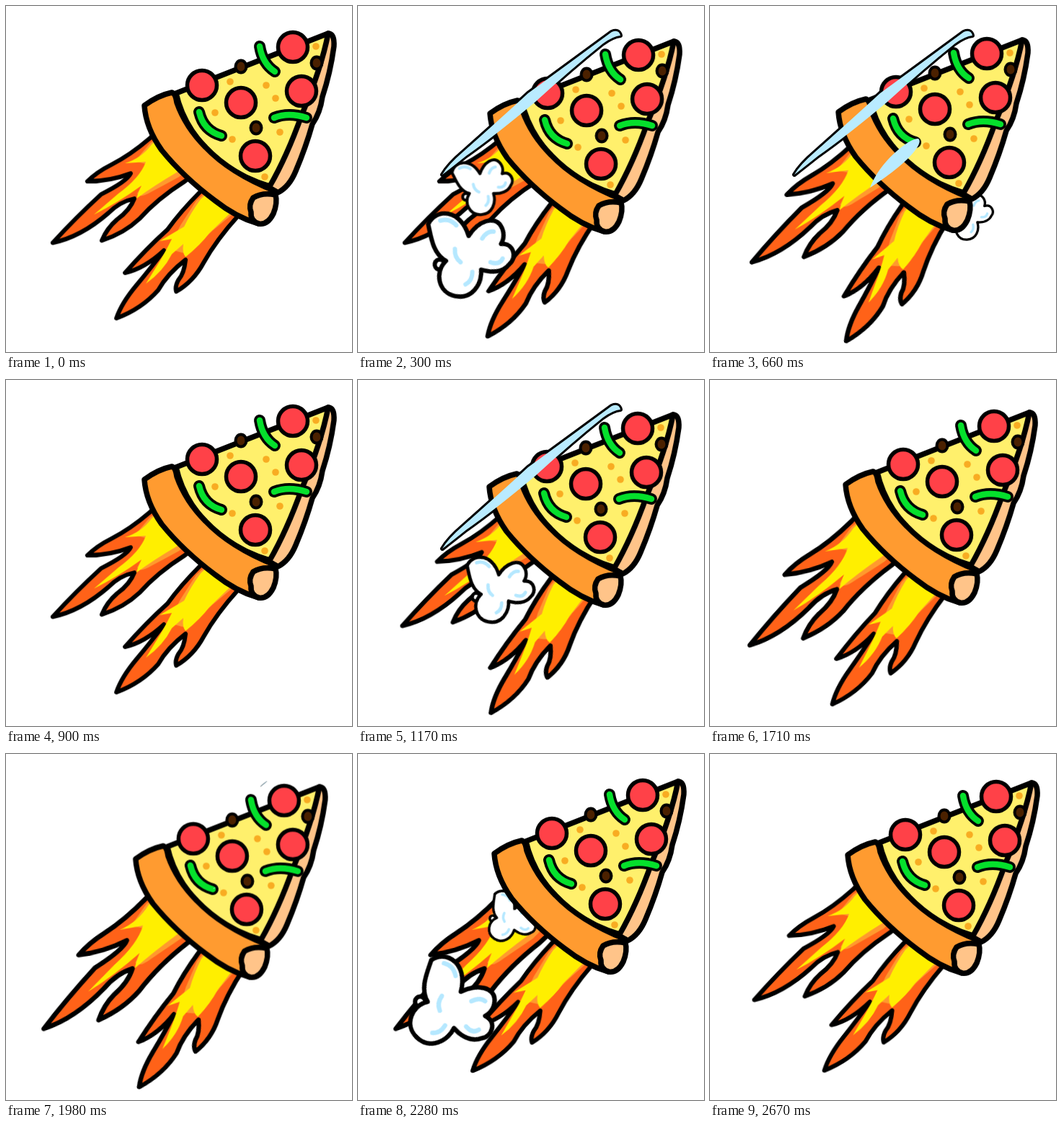
Write an HTML page without scripts that moves like this. It is 480 px wide and 480 px high and loops after 2.7 s.

```html
<!DOCTYPE html>
<html lang="en">
<head>
<meta charset="utf-8">
<title>Rocket pizza</title>
<style>
html, body { margin: 0; width: 100%; height: 100%; overflow: hidden; background: #fff; }
svg { display: block; width: 100%; height: 100%; }
.ink { stroke: #000; stroke-linejoin: round; stroke-linecap: round; }
.slice { stroke-width: 7.5; }
.flame { stroke-width: 6; fill: #ff6218; }
.glow { fill: #ff9a2e; }
.core { fill: #ffef00; }
.pepper { fill: none; stroke-linecap: round; }

#pizza { animation: bob 450ms linear infinite; }
@keyframes bob {
  0%, 100% { transform: translate(0, 0); }
  6.7% { transform: translate(-3px, 0); }
  46.7% { transform: translate(-14px, 9px); }
  60% { transform: translate(-10px, 10px); }
  66.7% { transform: translate(-9px, 11px); }
  80% { transform: translate(-4px, 7px); }
  93.3% { transform: translate(-1px, 2px); }
}

#left { animation: flareLeft 150ms linear infinite alternate; }
@keyframes flareLeft {
  to { transform: matrix(1.15, -.164, .083, 1.165, -52, 23); }
}
#right { animation: flareRight 225ms linear infinite alternate; }
@keyframes flareRight {
  to { transform: matrix(1.043, -.207, .264, .944, -83, 89); }
}

.puff { animation: puff 900ms linear infinite; animation-delay: calc(var(--start) - 900ms); }
@keyframes puff {
  0% { transform: translate(0, 0) scale(.54); visibility: visible; }
  3.33% { transform: translate(-42px, 55px) scale(.78); }
  6.67% { transform: translate(-85px, 110px) scale(1); }
  10.5% { transform: translate(-133px, 172px) scale(1.2); visibility: visible; }
  10.51%, 100% { transform: translate(-133px, 172px) scale(1.2); visibility: hidden; }
}

.streak { fill: #b9ebff; }
.rim { stroke: #000; stroke-width: 6; stroke-linejoin: round; }
.long { animation: long 450ms linear infinite; }
@keyframes long {
  0%, 40% { transform: translate(362px, 38px) scale(0); }
  46%, 67% { transform: none; }
  76%, 100% { transform: translate(118px, 233px) scale(0); }
}
.short { animation: short 450ms linear infinite; }
@keyframes short {
  0%, 40% { transform: translate(290px, 185px) scale(0); }
  46%, 48% { transform: none; }
  56%, 100% { transform: translate(224px, 250px) scale(0); }
}
</style>
</head>
<body>
<svg viewBox="0 0 480 480">
  <defs>
    <g id="cloud">
      <g class="ink" fill="#fff" stroke-width="6">
        <circle cx="-31" cy="20" r="7"/>
        <path d="M-24 13C-44 8-52-14-60-30C-56-54-22-62-2-28C6-52 26-64 38-52C46-44 46-34 44-28C62-34 70-14 62-4C56 10 40 14 26 13C32 32 24 56 0 57C-24 58-36 32-24 13Z"/>
      </g>
      <path fill="none" stroke="#b5e8ff" stroke-width="6" stroke-linecap="round" d="M-45-39Q-34-46-22-38M17-29Q21-41 30-42M36 0Q49 1 51-9M10 38Q18 31 15 19M-16-6Q-14 6-4 10"/>
    </g>
    <circle id="salami" class="ink" r="20.5" fill="#ff4148" stroke-width="5.5"/>
    <ellipse id="olive" class="ink" rx="7.5" ry="8.5" fill="#4b2100" stroke-width="4"/>
    <circle id="spice" r="4.8" fill="#f8ac22"/>
    <path id="peppers" d="M352 56Q356 80 373 91M268 147Q274 173 299 180M372 155Q392 147 417 155"/>
    <path id="long" d="M117 234Q125 220 145 203Q188 165 236 121Q295 78 352 36Q362 32 364 41Q354 42 340 52Q295 88 246 133Q190 180 150 208Q130 224 117 234Z"/>
    <path id="short" d="M222 252Q232 226 256 204Q278 184 289 184Q294 188 284 201Q268 222 222 252Z"/>
  </defs>

  <!-- Streak outlines show only outside the rocket -->
  <use href="#long" class="rim long"/>
  <use href="#short" class="rim short"/>

  <g id="left">
    <path class="ink flame" d="M222 162L200 183Q172 207 146 220Q126 230 113 243Q144 243 173 232Q168 243 132 261Q96 294 65 328Q104 320 142 287Q158 271 178 267Q172 283 154 296Q140 308 133 325Q164 315 185 295Q210 267 248 243L275 222Z"/>
    <path class="glow" d="M215 180L200 190L179 215L205 222L182 260Q186 267 201 258Q222 247 240 237L260 220Z"/>
    <path class="core" d="M218 178L202 192Q188 211 165 218Q181 217 194 216Q186 238 156 260L122 289Q155 273 188 249Q183 259 181 267Q204 250 238 230L258 214Z"/>
  </g>

  <g id="right">
    <path class="ink flame" d="M295 235L269 258Q242 285 224 310Q194 337 165 370Q192 364 219 339Q202 362 181 387Q160 412 153 433Q188 420 211 394Q224 371 249 352Q247 371 239 380Q234 389 236 396Q260 382 274 356Q292 324 322 291L345 262Z"/>
    <path class="glow" d="M292 245L264 270L242 304L225 337L248 343Q270 328 286 312L315 288L330 265Z"/>
    <path class="core" d="M295 245L270 268Q256 287 247 306L213 326L230 323Q220 343 210 359L194 385Q218 368 230 344L246 330Q244 342 249 348Q270 331 282 315L309 289L325 265Z"/>
  </g>

  <g transform="translate(235 235)"><g class="puff" style="--start:240ms"><use href="#cloud" transform="rotate(14)"/></g></g>
  <g transform="translate(217 231)"><g class="puff" style="--start:415ms"><use href="#cloud" transform="rotate(45)"/></g></g>
  <g transform="translate(193 222)"><g class="puff" style="--start:285ms"><use href="#cloud"/></g></g>
  <g transform="translate(217 218)"><g class="puff" style="--start:475ms"><use href="#cloud" transform="rotate(35)"/></g></g>
  <g transform="translate(358 291)"><g class="puff" style="--start:660ms"><use href="#cloud"/></g></g>

  <g id="pizza">
    <g class="ink slice">
      <path fill="#ffc489" d="M447 38Q456 38 455 56Q450 93 439 126Q436 148 425 164Q416 196 402 229Q393 251 377 259L364 251Z"/>
      <path fill="#fff06c" d="M447 38L236 121Q248 176 300 218Q332 240 366 250Q390 208 410 152Q438 85 447 38Z"/>
      <path fill="#ff9b30" d="M192 138Q211 124 230 120Q235 121 237 134Q249 168 277 196Q311 232 374 257L350 302Q319 293 290 270Q246 237 216 200Q194 169 192 138Z"/>
      <path fill="#ffc489" d="M343 266Q356 258 374 262Q377 273 371 288Q363 304 351 302Q339 299 340 286Q336 276 343 266Z"/>
    </g>
    <use href="#spice" x="311" y="105"/>
    <use href="#spice" x="361" y="110"/>
    <use href="#spice" x="374" y="128"/>
    <use href="#spice" x="430" y="56"/>
    <use href="#spice" x="290" y="148"/>
    <use href="#spice" x="380" y="175"/>
    <use href="#spice" x="314" y="185"/>
    <use href="#spice" x="359" y="237"/>
    <use href="#olive" x="326" y="84"/>
    <use href="#olive" x="431" y="79"/>
    <use href="#olive" x="347" y="169"/>
    <use href="#salami" x="272" y="110"/>
    <use href="#salami" x="398" y="57"/>
    <use href="#salami" x="326" y="134"/>
    <use href="#salami" x="410" y="118"/>
    <use href="#salami" x="346" y="208"/>
    <use href="#peppers" class="pepper" stroke="#000" stroke-width="16"/>
    <use href="#peppers" class="pepper" stroke="#05e02c" stroke-width="8.5"/>
  </g>

  <use href="#long" class="streak long"/>
  <use href="#short" class="streak short"/>
</svg>
</body>
</html>
```
